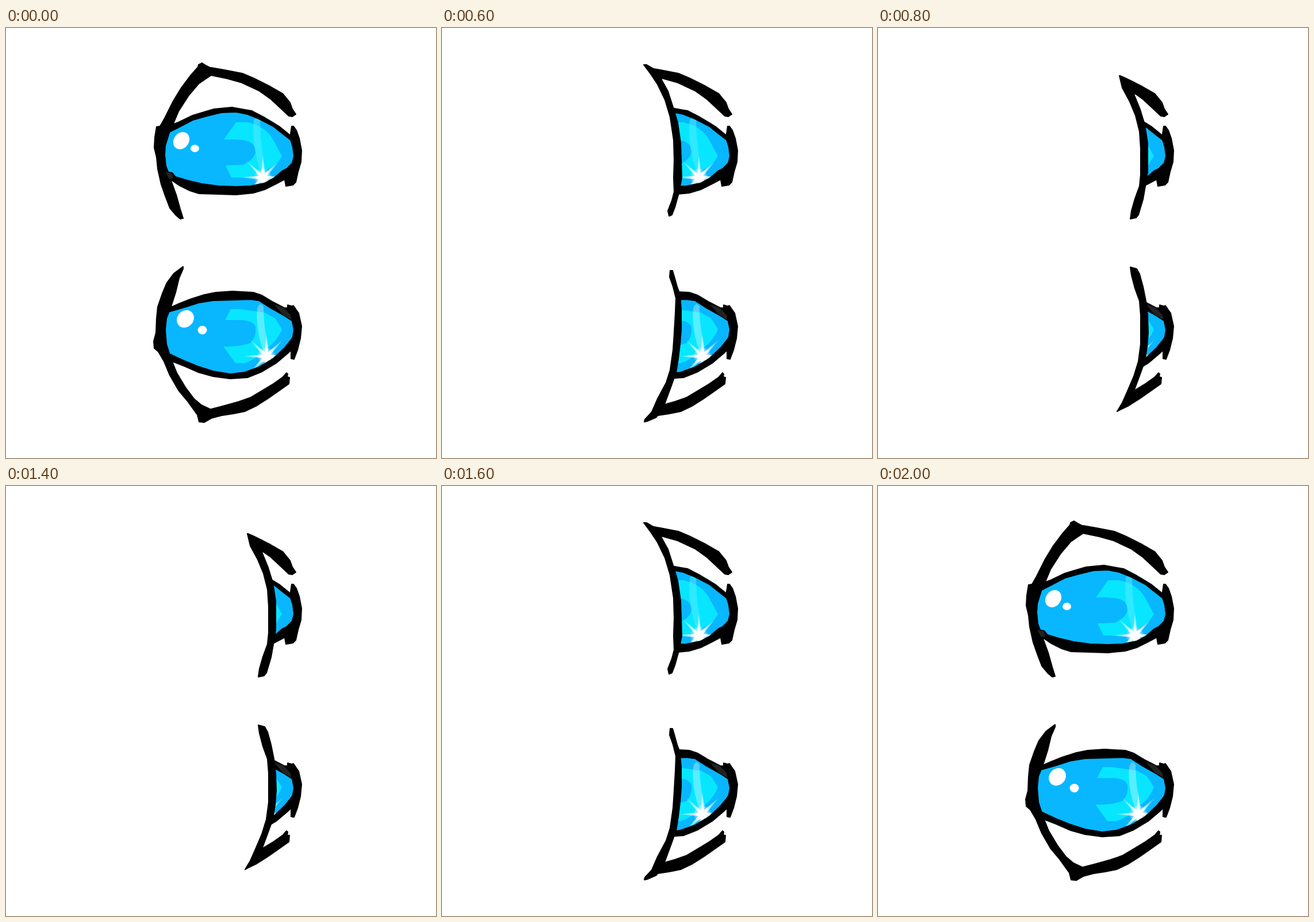
Write an HTML page that moves like this. It is 748x748 px and loops after 2600 ms.

```html
<!DOCTYPE html>
<html lang="en">
<head>
<meta charset="utf-8">
<title>Blinking eyes</title>
<style>
html, body { margin: 0; height: 100%; overflow: hidden; background: #fff; }
svg { display: block; width: 100%; height: 100%; }
.cut, .shine { fill: #fff; }
.iris { fill: #08b7ff; }
.cyan { fill: #08e6ff; }
.streak { fill: #fff; opacity: .32; }
.streak.dim { fill: #5ef; opacity: .5; }
.ink { stroke: #000; stroke-width: 2; stroke-linejoin: round; }
.soft { fill: #222; }
.pose { visibility: hidden; }
</style>
</head>
<body>
<svg viewBox="0 0 748 748">
<defs>
  <radialGradient id="ray" gradientUnits="userSpaceOnUse" cx="0" cy="0" r="43">
    <stop offset=".15" stop-color="#fff"/>
    <stop offset="1" stop-color="#fff" stop-opacity="0"/>
  </radialGradient>
  <radialGradient id="glow">
    <stop offset=".3" stop-color="#fff"/>
    <stop offset="1" stop-color="#fff" stop-opacity="0"/>
  </radialGradient>
  <path id="beam" d="M-43 0L0-3.500L43 0L0 3.500Z" fill="url(#ray)"/>
  <g id="spark">
    <circle r="16" fill="url(#glow)"/>
    <use href="#beam"/>
    <use href="#beam" transform="rotate(90)"/>
    <use href="#beam" transform="rotate(45)"/>
    <use href="#beam" transform="rotate(-45)"/>
  </g>
  <path id="shut" d="M471 97L475 95L481 101L493 123L505 148L513 175L518 205L521 238L517 252L508 272L497 293L490 306L482 324L478 328L471 327L472 320L482 298L487 282L489 265L496 245L499 225L498 200L494 168L488 142L476 115Z"/>
</defs>

<g id="eyes">
  <!-- upper eye -->
  <path class="iris" d="M276 182L300 168Q345 145 395 143Q435 143 470 167Q500 190 503 220Q502 240 485 252Q440 282 400 282Q340 282 274 258Z"/>
  <path class="cyan" d="M400 164H420Q452 171 465 195L480 223Q470 240 453 247Q435 258 420 260H392L382 239L412 238Q434 228 434 213Q432 197 412 195Q395 193 379 194Z"/>
  <path class="streak dim" d="M431 160Q437 151 442 160Q442 200 451 248L443 250Q427 205 431 160Z"/>
  <use href="#spark" x="447" y="260"/>
  <ellipse class="shine" rx="13" ry="16" transform="translate(305 196) rotate(35)"/>
  <ellipse class="shine" cx="328.500" cy="209.500" rx="7.500" ry="6.500"/>
  <path class="ink" d="M280 171L300 164L325 152L345 146L362 141L393 138L415 142L427 144L450 156L475 171L496 188L498 197L485 187L465 171L440 158L420 150L400 146L375 147L350 153L325 160L300 173L282 182Z"/>
  <path class="ink" d="M278 250L289 252L295 259L315 265L340 271L370 275L400 276L425 275L450 270L465 262L480 249L498 240L497 255L485 263L470 271L450 281L430 287L400 290L370 289L336 288L320 283L300 273L280 259Z"/>
  <path class="ink" d="M497 171L500 171L505 178L510 192L514 213L513 233L508 250L504 268L499 273L487 275L485 264L490 243L498 235L501 223L499 207L494 191Z"/>
  <path class="ink" d="M357 69L380 73L411 79L430 87L460 102L481 114L494 130L498 141L504 150L498 154L492 153L475 137L461 124L440 109L410 95L385 88L356 82Z"/>
  <!-- lower eye -->
  <path class="iris" d="M278 492L350 470H425Q470 484 503 510Q504 535 490 552Q440 604 395 606Q340 604 278 570Z"/>
  <path class="cyan" d="M391 489H407L450 495L468 505L480 524Q472 545 450 560Q432 578 415 583H399L378 554Q405 555 425 548Q436 538 434 520Q430 509 410 508H381Z"/>
  <path class="streak" d="M437 488Q442 474 448 485Q448 525 458 560L448 563Q434 525 437 488Z"/>
  <use href="#spark" x="453" y="571"/>
  <ellipse class="shine" rx="14" ry="16" transform="translate(312 506) rotate(42)"/>
  <ellipse class="shine" cx="341.500" cy="525.500" rx="8" ry="7.500"/>
  <path class="ink" d="M280 489L300 480L320 472L345 464L365 460L394 458L430 460L445 465L465 477L490 490L501 500L502 512L485 501L460 487L440 474L425 472L395 473L360 474L335 478L310 486L282 494Z"/>
  <path class="soft" d="M466 481L482 486L499 503V509L482 499Z"/>
  <path class="ink" d="M282 566L310 579L335 589L360 597L390 602L415 599L440 590L465 575L485 556L498 540L505 545L500 556L490 566L470 583L445 598L420 608L390 610L360 606L335 599L310 588L284 578Z"/>
  <path class="ink" d="M486 487L490 487L490 482L497 484L500 483L504 489L509 496L514 519L512 540L507 560L501 576L496 575L496 560L494 548L499 537L501 525L498 510L496 499Z"/>
  <path class="ink" d="M488 600L490 602L489 607L493 608L492 619L475 631L455 645L436 657L415 667L395 671L375 674L356 679L353 664L380 657L405 650L425 643L445 631L465 619L482 607Z"/>
</g>

<g class="pose">
  <path class="ink" d="M334 68L335 64L341 61L349 66L357 70V82L335 97L318 117L300 145L292 164L284 182L277 205L276 220L278 240L285 258L288 268L296 290L303 315L308 331L303 332L296 326L285 313L277 292L270 272L264 245L262 225L258 208L259 190L262 172L268 171L276 157L291 127L305 104L320 84Z"/>
  <path class="soft" d="M277 250L288 253L291 261L284 263Z"/>
  <path class="ink" d="M308 415V419L301 435L295 460L287 485L279 505L277 525L279 550L287 575L297 600L312 625L327 645L340 656L357 664V679L345 686L336 685L333 673L315 648L300 630L285 604L275 580L265 563L258 557L257 545L261 530L262 505L264 485L272 462L280 443L292 427Z"/>
</g>

<g class="pose">
  <path class="cut" d="M0 0H350L348 100L342 150L334 200L336 260L345 290V374L350 420L345 470L338 520L331 580L335 620L345 650L358 672L360 748H0Z"/>
  <path class="ink" d="M345 73L352 70L361 68L363 75L358 84L354 100L351 125L354 148L349 158L350 180L344 200L343 225L345 260L349 282L360 305L370 325L366 328L350 316L340 295L333 265L328 240L326 210L329 180L334 152L338 125L341 100Z"/>
  <path class="ink" d="M358 424L365 422L370 428L366 445L359 465L355 480L350 497L346 525L343 550L338 575L342 595L345 625L353 647L360 662L366 667L366 676L361 679L351 672L340 655L332 632L328 605L324 575L323 545L326 515L330 488L336 468L345 447Z"/>
</g>

<g class="pose">
  <path class="cut" d="M0 0H352V60L366 76L385 110L397 145L408 195L410 230L409 300V374L410 460L411 520L405 590L390 630L370 665L355 684V748H0Z"/>
  <path class="ink" d="M351 64L356 64L368 71L377 80L383 92L393 110L402 138L410 165L415 200L416 230L417 260L412 287L405 312L400 325L395 327L393 318L400 300L404 285L403 260L404 230L403 195L397 155L388 125L375 98L363 80Z"/>
  <path class="ink" d="M397 422L401 422L404 432L409 450L414 463L416 490L416 525L414 550L411 575L407 600L398 625L388 652L381 664L373 677L357 684L352 685L353 681L365 668L375 645L390 617L397 595L402 560L404 530L406 495L407 470L402 450L396 433Z"/>
</g>

<g class="pose">
  <path class="cut" d="M0 0H421V83L430 97L450 140L462 200V260L460 300V374L462 470L463 520L460 575L440 635L415 668V748H0Z"/>
  <path class="ink" d="M420 83L446 95L458 113L445 115L456 142L464 168L469 200L469 250L465 275L461 298L453 325L449 330L439 332L441 318L447 297L455 275L457 255L457 210L455 180L448 152L438 128L425 104Z"/>
  <path class="ink" d="M439 416L450 419L455 428L461 450L466 475L469 500L470 530L468 555L464 580L455 605L445 632L458 628L440 653L427 660L416 667L425 652L433 634L445 606L453 580L457 550L457 500L455 475L447 453L441 430Z"/>
</g>

<g class="pose">
  <use href="#shut"/>
  <use href="#shut" transform="matrix(1 0 0 -1 0 748)"/>
</g>
</svg>
<script>
const STEP = 200;
const blink = [0, 0, 1, 2, 3, 4, 4, 3, 2, 1, 0, 0, 0];
const poses = document.querySelectorAll('.pose');
const eyes = document.getElementById('eyes');
const start = performance.now();
const show = (el, on) => el.style.visibility = on ? 'visible' : 'hidden';

function draw() {
  const t = performance.now() - start;
  const pose = blink[Math.floor(t / STEP) % blink.length];
  poses.forEach((el, i) => show(el, i === pose));
  show(eyes, pose < 4);
  requestAnimationFrame(draw);
}
draw();
</script>
</body>
</html>
```
